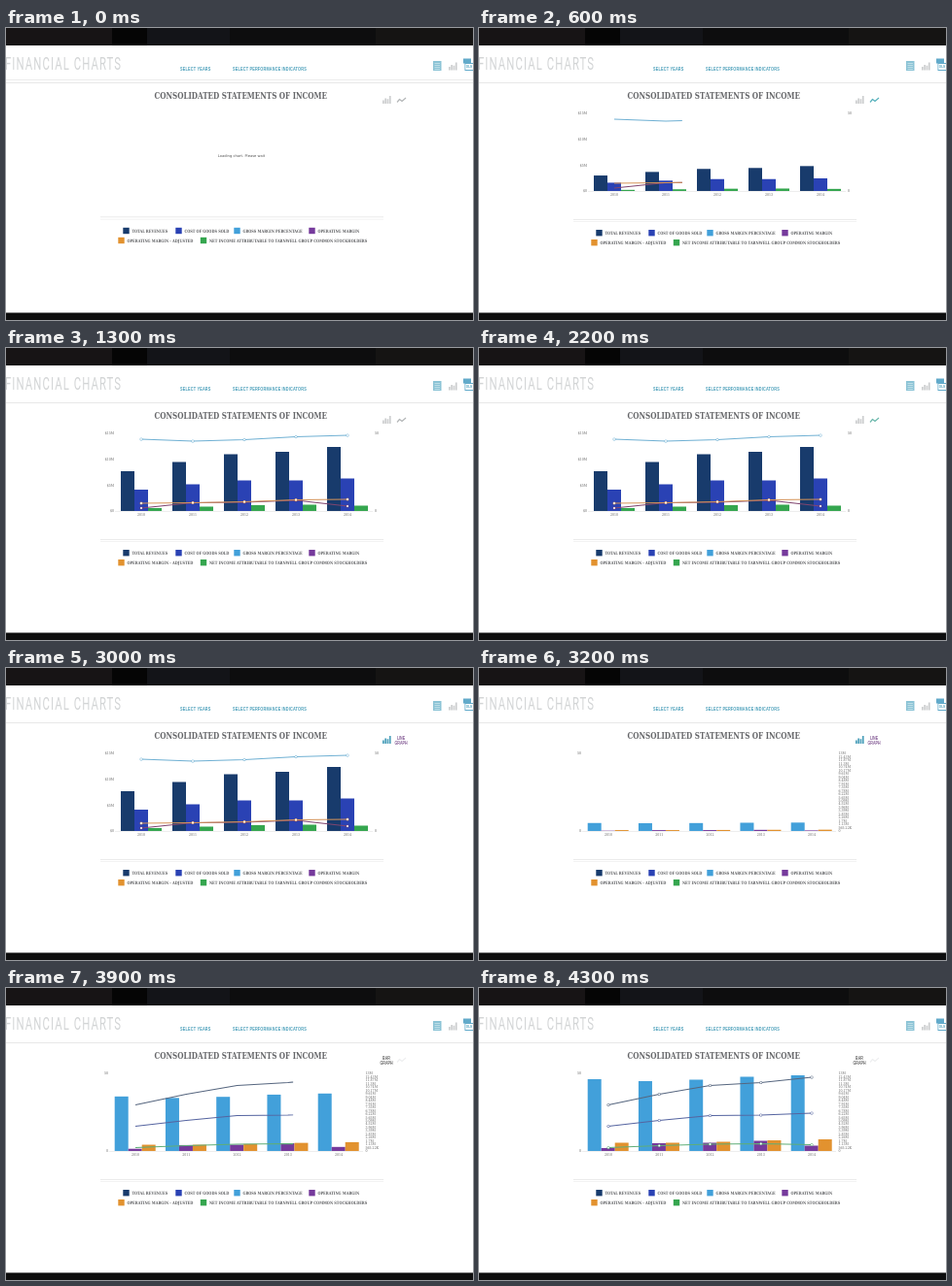
An HTML page with a canvas for the animation above (4400 ms loop, 480 px wide and 301 px high).

```html
<!DOCTYPE html>
<html lang="en">
<head>
<meta charset="utf-8">
<title>Financial charts</title>
<style>
html, body { margin: 0; width: 100%; height: 100%; overflow: hidden; background: #fff; }
canvas { display: block; width: 100%; height: 100%; }
</style>
</head>
<body>
<canvas id="stage"></canvas>
<script>
const W = 480, H = 301, LOOP = 4400, STEP = 100, BASE = 168, GROW = 1080;
const SLAB = '"DejaVu Serif", serif', SANS = '"Liberation Sans", sans-serif';
const NAVY = '#183b6c', BLUE = '#2a42b4', SKY = '#42a0da', PURPLE = '#763a9c',
      ORANGE = '#e2922f', GREEN = '#35a64f', TEAL = '#4b9fba', GREY = '#cccecf';
const SLAB_NARROW = 0.797, SANS_NARROW = 0.62;

const canvas = document.getElementById('stage');
const ctx = canvas.getContext('2d');
const ratio = window.devicePixelRatio || 1;
canvas.width = W * ratio;
canvas.height = H * ratio;

// Each chart: bar and line series hold the final y of five yearly values.
const first = {
  start: 180, x: 118, pitch: 53, labelX: 139, clip: [105, 267],
  bars: [
    [NAVY, [127, 117.5, 109.5, 107, 102]],
    [BLUE, [146, 140.5, 136.5, 136.5, 134.5]],
    [GREEN, [165, 163.5, 162, 161.5, 162.5]]
  ],
  lines: [
    ['#6fb0d3', [94, 96, 94.5, 91.5, 90]],
    ['#80456f', [165, 159.5, 159, 157, 163]],
    ['#d69458', [160, 159.5, 158.5, 156.5, 156]]
  ]
};
const second = {
  start: 3080, x: 111.7, pitch: 52.25, labelX: 133, clip: [100, 257],
  bars: [
    [SKY, [94, 96, 94.5, 91.5, 90]],
    [PURPLE, [165, 160, 159.5, 157.5, 162.5]],
    [ORANGE, [159.5, 159.5, 158.5, 157, 156]]
  ],
  lines: [
    ['#56667f', [120.5, 109.5, 100.5, 97.5, 92]],
    ['#5564a0', [142.5, 136.5, 131.5, 131, 129]],
    ['#5fae78', [164.5, 162.5, 161, 160.5, 161.5]]
  ]
};

const legend = [
  [120, 0, NAVY, 'TOTAL REVENUES'],
  [174, 0, BLUE, 'COST OF GOODS SOLD'],
  [234, 0, SKY, 'GROSS MARGIN PERCENTAGE'],
  [311, 0, PURPLE, 'OPERATING MARGIN'],
  [115, 10, ORANGE, 'OPERATING MARGIN - ADJUSTED'],
  [199.5, 10, GREEN, 'NET INCOME ATTRIBUTABLE TO TARNWELL GROUP COMMON STOCKHOLDERS']
];

function rect(x, y, w, h, color) {
  ctx.fillStyle = color;
  ctx.fillRect(x, y, w, h);
}

function text(str, x, y, font, color, { align = 'left', narrow = 1, spacing = 0 } = {}) {
  ctx.save();
  ctx.translate(x, y);
  ctx.scale(narrow, 1);
  ctx.font = font;
  ctx.letterSpacing = spacing + 'px';
  ctx.textAlign = align;
  ctx.textBaseline = 'alphabetic';
  ctx.fillStyle = color;
  ctx.fillText(str, 0, 0);
  ctx.restore();
}

function path(points, color, width = 1) {
  ctx.beginPath();
  points.forEach(([x, y]) => ctx.lineTo(x, y));
  ctx.strokeStyle = color;
  ctx.lineWidth = width;
  ctx.lineJoin = 'round';
  ctx.stroke();
}

function dot(x, y, r, color) {
  ctx.beginPath();
  ctx.arc(x, y, r, 0, Math.PI * 2);
  ctx.fillStyle = color;
  ctx.fill();
}

function barIcon(x, y, color) {
  [3.5, 5.5, 4.8, 8].forEach((h, i) => rect(x + i * 2.3, y - h, 1.7, h, color));
}

function lineIcon(color) {
  path([[402, 76.5], [404.5, 73.5], [407, 75.5], [411, 72]], color, 1.2);
}

function graphLabel(word, x, color) {
  const style = { align: 'center', narrow: 0.8 };
  text(word, x, 73.6, 'bold 4.5px ' + SANS, color, style);
  text('GRAPH', x, 78.6, 'bold 4.5px ' + SANS, color, style);
}

function page(loading) {
  rect(0, 0, W, H, '#0d0d0e');
  rect(0, 0, 109, 18, '#171415');
  rect(109, 0, 36, 18, '#050505');
  rect(145, 0, 85, 18, '#131418');
  rect(380, 0, 100, 18, '#151413');
  rect(0, 18, W, 275.5, '#fff');

  text('FINANCIAL CHARTS', -1, 43, '18.3px Roboto, sans-serif', '#d3d5d6', { narrow: SANS_NARROW, spacing: 1.75 });
  const nav = { narrow: SANS_NARROW, spacing: 0.28 };
  text('SELECT YEARS', 179, 43.6, 'bold 6.2px ' + SANS, TEAL, nav);
  text('SELECT PERFORMANCE INDICATORS', 233, 43.6, 'bold 6.2px ' + SANS, TEAL, nav);

  rect(439, 34, 8.5, 10, '#8cc4d6');
  for (let y = 36; y < 43; y += 2) rect(440.5, y, 5.5, 0.7, '#d5eaf0');
  barIcon(455, 43.5, GREY);
  rect(470, 31.5, 8, 5, '#62aaca');
  rect(471.5, 36, 9, 8, '#62aaca');
  rect(472.3, 37, 8, 6, '#fff');
  text('XLS', 473, 40.8, 'bold 4px ' + SANS, TEAL, { narrow: 0.8 });

  rect(0, 56, W, 0.8, '#e3e3e3');
  if (loading) rect(0, 53, W, 0.8, '#e8e8e8');
  text('CONSOLIDATED STATEMENTS OF INCOME', 152.5, 73.4, 'bold 9px ' + SLAB, '#66676a', { narrow: SLAB_NARROW });

  const top = loading ? 194.5 : 197;
  rect(97, top, 291, 0.7, '#e2e2e2');
  rect(97, top + 2.3, 291, 0.7, '#ededed');
  const row = loading ? 209 : 211.2;
  for (const [x, dy, color, name] of legend) {
    rect(x + 0.3, row + dy - 3.2, 6.4, 6.4, color);
    text(name, x + 9.4, row + dy + 1.7, 'bold 4.4px ' + SLAB, '#5e5f62', { narrow: SLAB_NARROW });
  }
}

function axes(chart) {
  const label = (str, x, y, align = 'left') =>
    text(str, x, y + 1.3, '4px ' + SLAB, '#666', { align, narrow: SLAB_NARROW });
  rect(chart.x - 6, BASE, 5 * chart.pitch, 0.5, '#ddd');
  for (let i = 0; i < 5; i++) label(2010 + i, chart.labelX + i * chart.pitch, 171.6, 'center');
  if (chart === first) {
    ['$15M', '$10M', '$5M', '$0'].forEach((s, i) => label(s, 111, 88 + i * 26.7, 'right'));
    label('50', 379, 88);
    label('0', 379, BASE);
  } else {
    label('50', 105, 88, 'right');
    label('0', 105, BASE, 'right');
    for (let i = 0; i < 24; i++) {
      const value = 13 * (1 - i / 23);
      const str = i === 23 ? '0' : i === 22 ? '565.22K' : +value.toFixed(2) + 'M';
      label(str, 369.5, 88 + i * 80 / 23);
    }
  }
}

function drawChart(chart, t) {
  const p = Math.min(1, Math.max(0, (t - chart.start) / GROW));
  axes(chart);
  chart.bars.forEach(([color, tops], s) => tops.forEach((y, i) => {
    const h = (BASE - y) * p;
    rect(chart.x + i * chart.pitch + s * 14, BASE - h, 14, h, color);
  }));

  const [left, width] = chart.clip;
  ctx.save();
  ctx.beginPath();
  ctx.rect(left, 80, width * p, 95);
  ctx.clip();
  for (const [color, ys] of chart.lines) {
    const points = ys.map((y, i) => [chart.labelX + i * chart.pitch, y]);
    path(points, color, 1.1);
    if (p === 1) points.forEach(([x, y]) => {
      dot(x, y, 1.5, color);
      dot(x, y, 1, '#fff');
    });
  }
  ctx.restore();
}

function toggles(t) {
  if (t < 2700) {
    const active = t >= 100 && t < 1000;
    barIcon(387, 78, GREY);
    lineIcon(t >= 2000 ? '#6db9ad' : active ? '#58b2bd' : '#b4b7b8');
  } else if (t < 3700) {
    barIcon(387, 78, TEAL);
    if (t >= 3400) dot(401.5, 74.5, 2.5, '#ecd0ea');
    graphLabel('LINE', 406, t < 3400 ? '#855c96' : '#77717c');
  } else {
    if (t < 3800) barIcon(387, 78, TEAL);
    else graphLabel('BAR', 391, '#666');
    lineIcon('#eeeff0');
  }
}

function draw(now) {
  const t = Math.floor(now % LOOP / STEP) * STEP;
  const loading = t < 100;
  ctx.setTransform(ratio, 0, 0, ratio, 0, 0);
  page(loading);
  toggles(t);
  if (loading) {
    text('Loading chart. Please wait', 242, 133.3, '3.7px "DejaVu Sans", sans-serif', '#555', { align: 'center' });
  } else {
    drawChart(t < 3200 ? first : second, t);
  }
}

const began = performance.now();
function tick() {
  draw(performance.now() - began);
  requestAnimationFrame(tick);
}
tick();
</script>
</body>
</html>
```
